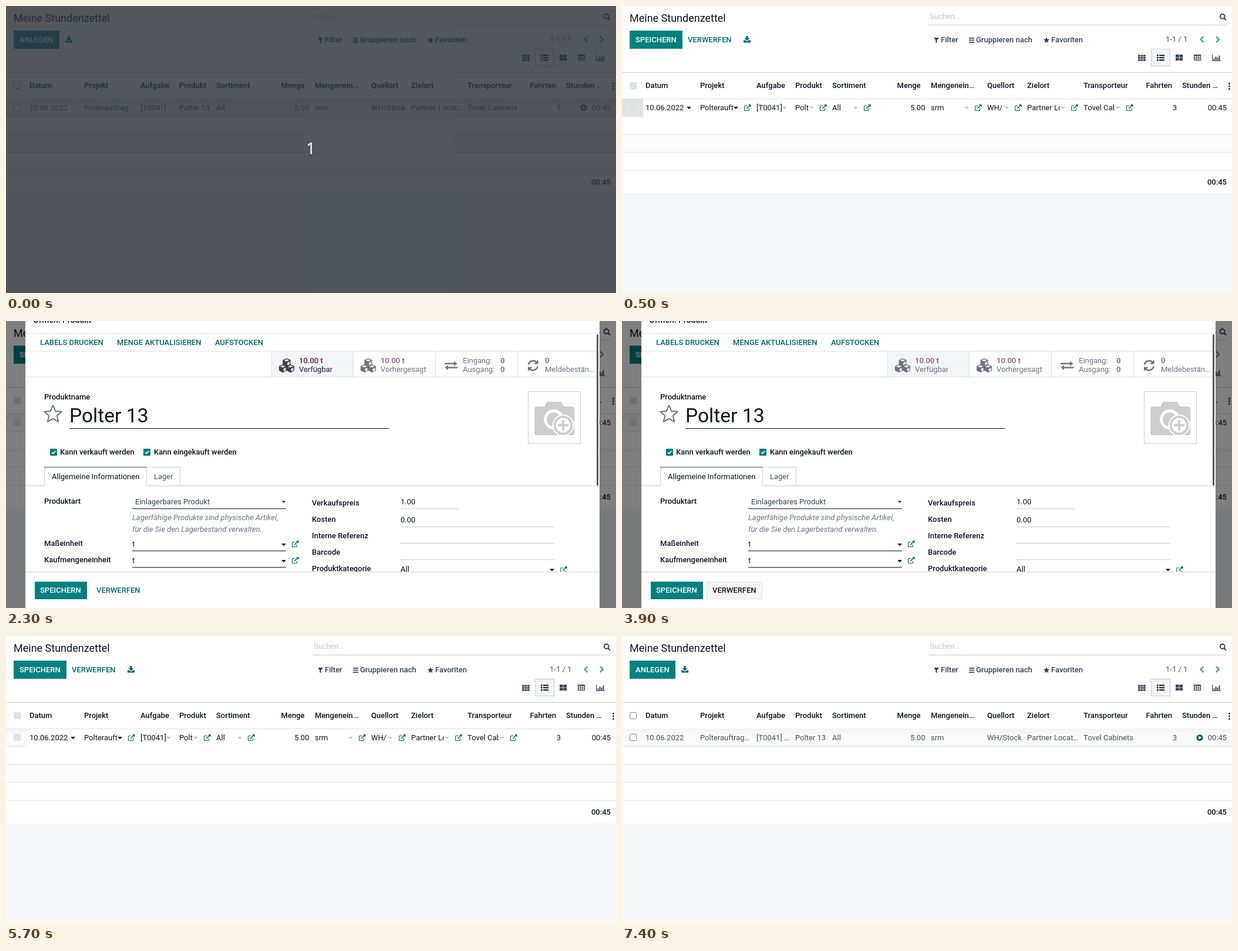
Animation of 1039 by 490 pixels, one loop 8000 ms. Source, as an HTML page:

```html
<!DOCTYPE html>
<html lang="de">
<head>
<meta charset="utf-8">
<title>Meine Stundenzettel</title>
<style>
html, body { margin: 0; width: 100%; height: 100%; overflow: hidden; background: #fff; }
svg { display: block; }
#stage { width: 1039px; height: 490px; }
text { font: 400 13px Roboto, sans-serif; fill: #0d121d; white-space: pre; }
.b { font-weight: 500; }
.teal { fill: #00666b; color: #00666b; }
.white { fill: #fff; }
.soft { fill: #495057; }
.mid { fill: #374151; color: #374151; }
.dim { fill: #6b7280; color: #6b7280; }
.plum { fill: #7c5f76; }
.plumDark { fill: #66425c; }
.title { font-size: 18px; }
.i { font-style: italic; }
.big { font-size: 33.6px; }
.count { font: 400 27px "Noto Sans", sans-serif; fill: #fff; }

/* hard cuts on an 8 s clock */
.on { opacity: 0; animation: 8s step-end infinite; }
#cover { animation-name: cover; }
#list { animation-name: list; }
#rowHover { animation-name: rowHover; }
#edit { animation-name: edit; }
#cellHover { animation-name: cellHover; }
#linkHover { animation-name: linkHover; }
#focus { animation-name: focus; }
#loading { animation-name: loading; }
#modal { animation-name: modal; }
#statHover { animation-name: statHover; }
#closeHover { animation-name: closeHover; }
#sort { animation-name: sort; }
#saveHover { animation-name: saveHover; }
#dropHover { animation-name: dropHover; }
#ring { animation-name: ring; }
@keyframes cover { 0% { opacity: 1 } 1.25% { opacity: 0 } }
@keyframes list { 0%, 91.25% { opacity: 1 } 5% { opacity: 0 } }
@keyframes rowHover { 0% { opacity: 1 } 5% { opacity: 0 } }
@keyframes edit { 5% { opacity: 1 } 91.25% { opacity: 0 } }
@keyframes cellHover { 5% { opacity: 1 } 20% { opacity: 0 } }
@keyframes linkHover { 10% { opacity: 1 } 20% { opacity: 0 } }
@keyframes focus { 15% { opacity: 1 } 20% { opacity: 0 } }
@keyframes loading { 16.25% { opacity: 1 } 20% { opacity: 0 } }
@keyframes modal { 20% { opacity: 1 } 52.5% { opacity: .35 } 53.75% { opacity: 0 } }
@keyframes statHover { 28.75% { opacity: 1 } 43.75% { opacity: 0 } }
@keyframes closeHover { 48.75% { opacity: 1 } 53.75% { opacity: 0 } }
@keyframes sort { 70% { opacity: 1 } 71.25% { opacity: 0 } }
@keyframes saveHover { 76.25%, 87.5% { opacity: 1 } 83.75%, 91.25% { opacity: 0 } }
@keyframes dropHover { 83.75% { opacity: 1 } 87.5% { opacity: 0 } }
@keyframes ring { 90% { opacity: 1 } 91.25% { opacity: 0 } }
</style>
</head>
<body>
<svg id="stage" viewBox="0 0 1039 490"></svg>
<script>
const LINE = '#dee2e6', EDGE = '#c9ccd2', TEAL = '#008080', DARK = '#00666b', INK = '#0d121d';

const text = (x, y, s, cls = '') => `<text x="${x}" y="${y}" class="${cls}">${s}</text>`;
const end = (x, y, s, cls = '') => `<text x="${x}" y="${y}" class="${cls}" text-anchor="end">${s}</text>`;
const rect = (x, y, w, h, fill, more = '') =>
  `<rect x="${x}" y="${y}" width="${w}" height="${h}" fill="${fill}" ${more}/>`;
const frame = (x, y, w, h, fill, stroke) =>
  rect(x + .5, y + .5, w - 1, h - 1, fill, `stroke="${stroke}"`);
const hline = (x1, x2, y, c = LINE) => rect(x1, y, x2 - x1, 1, c);
const vline = (x, y1, y2, c = LINE) => rect(x, y1, 1, y2 - y1, c);
const path = (d, fill, more = '') => `<path d="${d}" fill="${fill}" ${more}/>`;
const stroke = (d, c, w) => path(d, 'none', `stroke="${c}" stroke-width="${w}"`);
const at = (x, y, s, more = '') => `<g transform="translate(${x} ${y})" ${more}>${s}</g>`;
const on = (id, s) => `<g id="${id}" class="on">${s}</g>`;
const clip = (x, y, w, s) => `<svg x="${x}" y="${y}" width="${w}" height="24" overflow="hidden">${s}</svg>`;
const range = (n, f) => Array.from({ length: n }, (_, i) => f(i)).join('');

const caret = (x, y, c = INK) => path(`M${x} ${y}h8l-4 4.3z`, c);
const link = (x, y, c = DARK) => at(x, y,
  stroke('M8.5 6.5v3q0 1-1 1h-6q-1 0-1-1v-6q0-1 1-1h4', c, 1.1) +
  stroke('M4.2 7.2L10 1.4', c, 1.5) + path('M7 0h4.6v4.6z', c));
const star = (cx, cy, r, inner = .42) => 'M' + Array.from({ length: 10 }, (_, i) => {
  const a = i * Math.PI / 5, k = i % 2 ? r * inner : r;
  return `${(cx + k * Math.sin(a)).toFixed(2)} ${(cy - k * Math.cos(a)).toFixed(2)}`;
}).join('L') + 'z';
const download = x => at(x, 51,
  path('M4.3 0h3.4v4h2.8L6 8.4 1.5 4h2.8z', DARK) +
  path('M0 7.5h3.2L6 10l2.8-2.5H12V11.500H0z', DARK));
const tick = (x, y) => rect(x, y, 12, 12, TEAL, 'rx="1"') +
  stroke(`M${x + 3} ${y + 6}l2.200 2.300l4-4.300`, '#fff', 1.6);
const emptyBox = (x, y) => rect(x + .5, y + .5, 11, 11, '#fff', 'stroke="#80848b" rx="1"');
const cube = (x, y) => at(x, y,
  path('M0-6.800l6.500 2.800v7.500l-6.500 3.500l-6.500-3.500v-7.500z', 'currentColor') +
  path('M0-5.300l4.600 1.900l-4.600 1.900l-4.600-1.900z', '#f6f6f7') +
  path('M1.200 .6l4-1.700v4l-4 2.200z', '#f6f6f7'));
const cubes = x => cube(x + 13, 70.500) + cube(x + 6.500, 81) + cube(x + 19.500, 81);

function page() {
  const heads = [[40, 'Datum'], [133, 'Projekt'], [229, 'Aufgabe'], [295, 'Produkt'], [358, 'Sortiment'],
    [526, 'Mengenein…'], [622, 'Quellort'], [690, 'Zielort'], [786, 'Transporteur'], [954, 'Stunden …']];
  const tools =
    path('M531 54h9l-3.400 4.200v5.300l-2.200-1.600v-3.700z', '#374151') +
    text(543, 62, 'Filter', 'b mid') +
    range(3, i => rect(591, 54 + i * 3.500, 9, 1.7, '#374151')) +
    text(603, 62, 'Gruppieren nach', 'b mid') +
    path(star(723, 58.500, 5.500, .45), '#374151') + text(731, 62, 'Favoriten', 'b mid') +
    text(926, 61, '1-1 / 1', 'soft') +
    stroke('M990.500 52l-5 5l5 5', '#4a9390', 2.2) + stroke('M1012 52l5 5l-5 5', '#4a9390', 2.2);
  const views =
    range(9, i => rect(879 + i % 3 * 4.500, 83.500 + (i / 3 | 0) * 3.700, 3.800, 2.900, '#374151')) +
    frame(901, 73, 33, 30, '#f3f4f6', EDGE) +
    range(3, i => rect(911, 83 + i * 4, 2.500, 2.500, INK) + rect(915, 83.300 + i * 4, 9, 2, INK)) +
    range(4, i => rect(943 + i % 2 * 6.500, 83 + (i >> 1) * 5.500, 5.700, 4.700, '#374151')) +
    rect(974.600, 83.500, 11, 9.500, 'none', 'stroke="#374151" stroke-width="1.2" rx="1"') +
    rect(974, 83, 12, 2.200, '#374151') +
    stroke('M978.300 84v9M982 84v9M974 87.600h12M974 90.300h12', '#374151', .9) +
    stroke('M1005.600 83v10.400h14.400', '#374151', 1.2) +
    stroke('M1008.500 92.500v-3M1011.500 92.500v-6M1014.500 92.500v-4.500M1017.500 92.500v-8', '#374151', 1.9);
  return rect(0, 0, 1039, 320, '#fff') + rect(0, 320, 1039, 170, '#f5f6f8') +
    text(13, 27, 'Meine Stundenzettel', 'title') +
    `<text x="524" y="22" style="fill:#c3c6cb">Suchen...</text>` + hline(522, 1030, 32, EDGE) +
    `<circle cx="1022.700" cy="17.800" r="4" fill="none" stroke="#374151" stroke-width="1.900"/>` +
    stroke('M1025.500 20.700l3.500 3.500', '#374151', 2.200) +
    tools + views + hline(0, 1039, 113, EDGE) +
    heads.map(([x, s]) => text(x, 140, s, 'b')).join('') +
    end(508.500, 140, 'Menge', 'b') + end(937, 140, 'Fahrten', 'b') +
    range(3, i => rect(1033, 131 + i * 4.600, 2.800, 2.800, '#374151')) +
    rect(0, 220, 1039, 29, '#fcfcfc') + [219, 249, 280].map(y => hline(0, 1039, y)).join('') +
    end(1030, 305, '00:45', 'b');
}

function list() {
  const cells = [[40, '10.06.2022'], [133, 'Polterauftrag…'], [229, '[T0041] …'], [295, 'Polter 13'],
    [358, 'All'], [526, 'srm'], [622, 'WH/Stock'], [690, 'Partner Locat…'], [786, 'Tovel Cabinets']];
  return rect(13, 42, 78, 31, TEAL) + text(23, 62, 'ANLEGEN', 'b white') + download(101) +
    rect(0, 158, 1039, 31, 'url(#rest)') + on('rowHover', rect(0, 158, 1039, 31, 'url(#hover)')) +
    hline(0, 1039, 188) + emptyBox(13, 130) + emptyBox(13, 167) +
    cells.map(([x, s]) => text(x, 178, s, 'soft')).join('') +
    end(516.500, 178, '5.00', 'soft') + end(945, 178, '3', 'soft') + end(1030, 178, '00:45', 'soft') +
    `<circle cx="984" cy="173.500" r="5.600" fill="${DARK}"/>` + path('M982.300 170.500l5 3l-5 3z', '#fff');
}

function edit() {
  const cut = [[133, 56, 'Polterauft'], [229, 43, '[T0041]'], [295, 23, 'Polter'], [622, 27, 'WH/Stock'],
    [690, 56, 'Partner Loc'], [786, 53, 'Tovel Cabi']];
  return rect(13, 42, 90, 31, TEAL) + text(112, 62, 'VERWERFEN', 'b teal') + download(207) +
    on('saveHover', rect(13, 42, 90, 31, DARK)) +
    on('ring', rect(12, 41, 92, 33, 'none', 'stroke="#80bfbf" stroke-width="2"')) +
    text(23, 62, 'SPEICHERN', 'b white') +
    on('dropHover', frame(103, 42, 94, 31, '#f5f6f8', LINE) + text(112, 62, 'VERWERFEN', 'b')) +
    on('sort', caret(84, 134.500, '#374151')) +
    rect(0, 158, 36, 31, 'url(#rest)') + on('cellHover', rect(0, 158, 36, 31, '#e3e3e2')) +
    hline(0, 36, 188) + hline(0, 1039, 158) +
    rect(13, 130, 12, 12, '#dee2e6') + rect(13, 167, 12, 12, '#dee2e6') +
    text(40, 178, '10.06.2022') + text(358, 178, 'All') + text(526, 178, 'srm') +
    cut.map(([x, w, s]) => clip(x, 162, w, text(0, 16, s))).join('') +
    end(516.500, 178, '5.00') + end(945, 178, '3') + end(1030, 178, '00:45') +
    [110, 190].map(x => caret(x, 172)).join('') +
    [273, 319, 394, 583, 651, 747, 841].map(x => caret(x, 172, '#c6c8cb')).join('') +
    [208, 337, 412, 601, 669, 765, 859].map(x => link(x, 168)).join('') +
    on('linkHover', link(337, 168, INK)) +
    on('focus', rect(295, 162, 33, 24, '#fff') + clip(295, 162, 22, end(21.500, 16, 'Polter 13')) + caret(319, 172, TEAL)) +
    on('loading', rect(944, 486, 95, 4, '#714b67'));
}

function stats() {
  const first = (cls, num) => `<g class="${cls}">${cubes(465)}</g>` +
    text(499, 72, '10.00 t', 'b ' + num) + text(499, 87, 'Verfügbar', cls);
  return rect(452, 52, 140, 43, '#f3f4f6') + [452, 591, 731, 871].map(x => vline(x, 52, 95)).join('') +
    first('dim', 'plum') + on('statHover', first('mid', 'plumDark')) +
    `<g class="dim">${cubes(604)}</g>` +
    text(638, 72, '10.00 t', 'b plum') + text(638, 87, 'Vorhergesagt', 'dim') +
    path('M747 71.500h16v-3l5.500 4.200l-5.500 4.200v-3h-16z', '#6b7280') +
    path('M769 78.300h-16v-3l-5.500 4.200l5.500 4.200v-3h16z', '#6b7280') +
    text(778, 72, 'Eingang:', 'dim') + text(778, 87, 'Ausgang:', 'dim') +
    end(849.500, 72, '0', 'b plum') + end(849.500, 87, '0', 'b plum') +
    stroke('M890 74.500a8 8 0 0 1 13.500-4.200M905.500 77.500a8 8 0 0 1-13.500 4.200', '#6b7280', 2.600) +
    path('M906.500 66v7.500h-7.500zM889 86v-7.500h7.500z', '#6b7280') +
    text(918, 72, '0', 'b plum') + text(918, 87, 'Meldebestän…', 'dim');
}

function photo() {
  return frame(889, 120, 90, 90, '#fff', EDGE) +
    path('M904 146h13l4-8h25l4 8h14q4 0 4 4v41q0 4-4 4h-60q-4 0-4-4v-41q0-4 4-4z', '#cdcdcd') +
    `<circle cx="933" cy="168" r="14.500" fill="none" stroke="#fff" stroke-width="5"/>
     <circle cx="949" cy="178" r="18.500" fill="#fff"/>
     <circle cx="949" cy="178" r="14.500" fill="#fff" stroke="#cdcdcd" stroke-width="4"/>` +
    stroke('M949 169v18M940 178h18', '#cdcdcd', 4);
}

function modal() {
  const labels = [[65, 134, 'Produktname'], [92, 228, 'Kann verkauft werden'], [252, 228, 'Kann eingekauft werden'],
    [65, 312, 'Produktart'], [65, 384, 'Maßeinheit'], [65, 412, 'Kaufmengeneinheit'], [521, 315, 'Verkaufspreis'],
    [521, 343, 'Kosten'], [521, 371, 'Interne Referenz'], [521, 399, 'Barcode'], [521, 427, 'Produktkategorie']];
  const values = [[215, 385, 't'], [215, 413, 't'], [672, 313, '1.00'], [672, 344, '0.00'], [672, 428, 'All']];
  const tabs = hline(33, 1007, 281, EDGE) + frame(239, 249, 58, 33, '#fff', EDGE) +
    frame(65, 249, 175, 33, '#fff', EDGE) + rect(66, 281, 173, 1, '#fff') + hline(65, 240, 249, '#495057') +
    text(78, 270, 'Allgemeine Informationen') + text(252, 270, 'Lager', 'soft');
  const footer = rect(33, 428, 978, 62, '#fff') + hline(33, 1011, 428, EDGE) +
    rect(49, 445, 89, 30, TEAL) + text(58, 464, 'SPEICHERN', 'b white') + text(154, 464, 'VERWERFEN', 'b teal') +
    on('closeHover', frame(144, 445, 95, 30, '#f5f6f8', LINE) + text(154, 464, 'VERWERFEN', 'b'));
  return rect(0, 0, 1039, 490, '#000', 'opacity=".5"') + rect(33, 0, 978, 490, '#fff') +
    `<text x="46" y="3" class="b" style="font-size:14px">Öffnen: Produkt</text>` +
    [21, 51, 95].map(y => hline(33, 1007, y, LINE)).join('') +
    text(58, 41, 'LABELS DRUCKEN', 'b teal') + text(189, 41, 'MENGE AKTUALISIEREN', 'b teal') +
    text(356, 41, 'AUFSTOCKEN', 'b teal') + stats() + photo() +
    path(star(80, 159.500, 15.500, .46), 'none', 'stroke="#6b7280" stroke-width="2" stroke-linejoin="round"') +
    text(108, 173, 'Polter 13', 'big') + hline(108, 653, 183, INK) +
    tick(75, 218) + tick(234, 218) + tabs +
    labels.map(([x, y, s]) => text(x, y, s, 'b')).join('') +
    values.map(([x, y, s]) => text(x, y, s)).join('') +
    text(220, 313, 'Einlagerbares Produkt', 'mid') + path('M469.500 307h7l-3.500 4z', '#374151') +
    text(215, 340, 'Lagerfähige Produkte sind physische Artikel,', 'i dim') +
    text(215, 360, 'für die Sie den Lagerbestand verwalten.', 'i dim') +
    [320, 392, 420].map(y => hline(215, 477, y, INK)).join('') +
    hline(672, 772, 320, EDGE) + [351, 379, 407].map(y => hline(672, 934, y, EDGE)).join('') +
    caret(469, 380) + caret(469, 408) + caret(926, 423) +
    link(487, 375) + link(487, 403) + link(944, 419) +
    footer + rect(1006, 23, 3, 258, '#5a5a5a', 'rx="1"');
}

const shade = (id, a, b) => `<linearGradient id="${id}" x2="0" y2="1">
  <stop stop-color="${a}"/><stop offset=".4" stop-color="${b}"/></linearGradient>`;

document.getElementById('stage').innerHTML =
  `<defs>${shade('rest', '#f1f1f1', '#fafafa')}${shade('hover', '#e6e6e6', '#f2f2f2')}</defs>` +
  page() + on('list', list()) + on('edit', edit()) + on('modal', modal()) +
  on('cover', rect(0, 0, 1039, 490, 'rgba(44,49,55,.81)') +
    '<text x="519" y="253" class="count" text-anchor="middle">1</text>');
</script>
</body>
</html>
```
